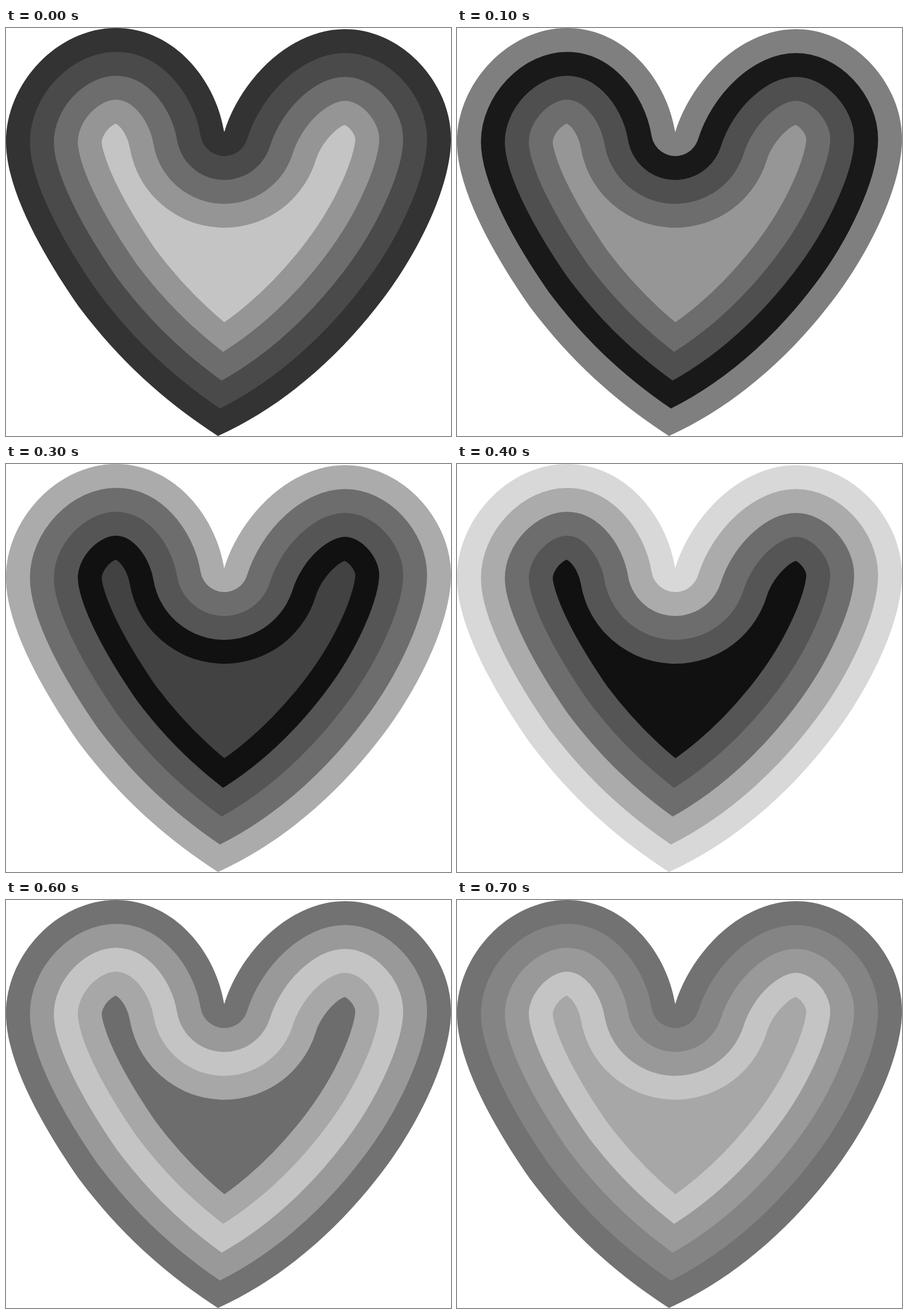
These frames come from a looping animation (781 px wide and 717 px high, 800 ms). An HTML page:

```html
<!DOCTYPE html>
<html lang="en">
<head>
<meta charset="utf-8">
<title>Pulsing heart</title>
<style>
  html, body { margin: 0; width: 100%; height: 100%; overflow: hidden; background: #fff; }
  svg { display: block; width: 781px; height: 717px; }
</style>
</head>
<body>
<svg viewBox="0 0 781 717">
  <defs>
    <path id="heart" d="M372 717 C275 654 197 582 128 490 C73 411 0 290 0 200
      C0 97 90 0 193 0 C295 0 368 91 383 183
      C411 92 497 2 595 2 C695 2 781 96 781 195
      C781 279 722 397 660 478 C585 577 488 664 372 717 Z"/>
    <mask id="inside" maskUnits="userSpaceOnUse" x="0" y="0" width="781" height="717">
      <use href="#heart" fill="#fff"/>
    </mask>
  </defs>
  <g id="rings" mask="url(#inside)" stroke-linejoin="round"></g>
</svg>
<script>
  const STEP = 100;
  const BAND = 42;

  // Grey levels from the outer band to the core, one row per step.
  const shades = [
    [0x33, 0x4a, 0x6d, 0x95, 0xc4],
    [0x7f, 0x19, 0x4f, 0x6d, 0x96],
    [0x7f, 0x5b, 0x11, 0x42, 0x5a],
    [0xab, 0x6d, 0x55, 0x11, 0x42],
    [0xd8, 0xab, 0x6d, 0x55, 0x11],
    [0xb2, 0xc8, 0xa8, 0x6d, 0x55],
    [0x72, 0x99, 0xc4, 0xa7, 0x6d],
    [0x72, 0x84, 0x99, 0xc4, 0xa7]
  ];

  const rings = document.getElementById('rings');
  const grey = v => `rgb(${v}, ${v}, ${v})`;

  function addRing(i) {
    const ring = document.createElementNS('http://www.w3.org/2000/svg', 'use');
    const core = i === 4;
    const prop = core ? 'fill' : 'stroke';
    ring.setAttribute('href', '#heart');
    if (!core) {
      ring.setAttribute('fill', 'none');
      ring.setAttribute('stroke-width', 2 * BAND * (i + 1));
    }
    rings.append(ring);

    const frames = [...shades, shades[0]].map((row, n) => ({
      [prop]: grey(row[i]),
      offset: n / shades.length,
      easing: 'steps(1, end)'
    }));
    return ring.animate(frames, { duration: STEP * shades.length, iterations: Infinity });
  }

  // Core first, then ever thinner strokes on top.
  const anims = [4, 3, 2, 1, 0].map(addRing);
  const start = document.timeline.currentTime;
  anims.forEach(a => { a.startTime = start; });
</script>
</body>
</html>
```
